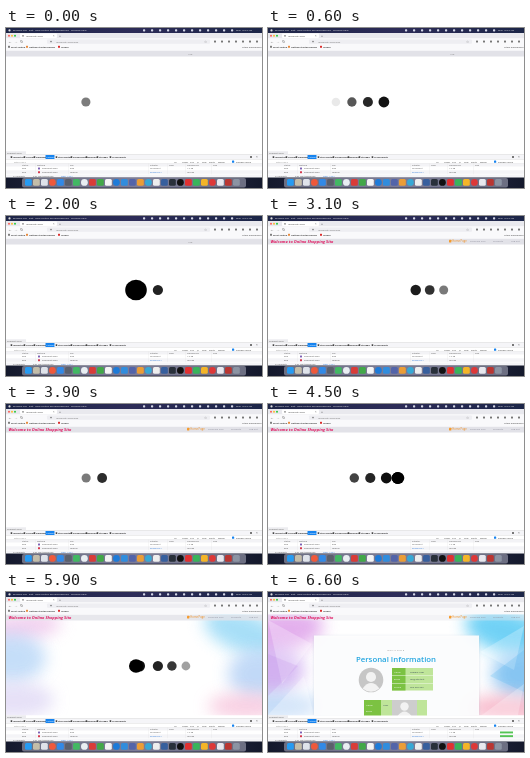
An HTML page for the animation above (7000 ms loop, 256x160 px).

```html
<!DOCTYPE html>
<html lang="en">
<head>
<meta charset="utf-8">
<style>
html, body { margin: 0; width: 100%; height: 100%; overflow: hidden; background: #fff; }
svg { display: block; width: 256px; height: 160px; font-family: "Open Sans", sans-serif; }
</style>
</head>
<body>
<svg id="stage" viewBox="0 0 256 160"></svg>
<script>
const rect = (x, y, w, h, fill, rx = 0, more = '') =>
  `<rect x="${x}" y="${y}" width="${w}" height="${h}" fill="${fill}" rx="${rx}" ${more}/>`;
const dot = (x, y, r, fill) => `<circle cx="${x}" cy="${y}" r="${r}" fill="${fill}"/>`;
const text = (x, y, size, fill, str, more = '') =>
  `<text x="${x}" y="${y}" font-size="${size}" fill="${fill}" ${more}>${str}</text>`;
const glow = (x, y, rx, ry, fill, opacity, turn = 0) =>
  `<ellipse cx="${x}" cy="${y}" rx="${rx}" ry="${ry}" fill="${fill}" opacity="${opacity}" transform="rotate(${turn} ${x} ${y})" filter="url(#soft)"/>`;
const facet = (d, fill, opacity) => `<path d="${d}z" fill="${fill}" opacity="${opacity}"/>`;
const labels = (items, y, size, fill, more) => items.map(([x, s]) => text(x, y, size, fill, s, more)).join('');
const group = (id, body) => `<g id="${id}">${body}</g>`;

const defs = `<defs>
  <filter id="soft" x="-60%" y="-60%" width="220%" height="220%"><feGaussianBlur stdDeviation="8"/></filter>
  <filter id="shade"><feGaussianBlur stdDeviation="1.5"/></filter>
  <clipPath id="page"><rect y="22" width="256" height="101.5"/></clipPath>
  <linearGradient id="menu"><stop stop-color="#1d2547"/><stop offset=".5" stop-color="#2d2c58"/><stop offset="1" stop-color="#1c2648"/></linearGradient>
  <linearGradient id="desk"><stop stop-color="#14192c"/><stop offset=".5" stop-color="#343456"/><stop offset="1" stop-color="#14192c"/></linearGradient>
</defs>`;

function browserTop() {
  const menus = [[7, 'Browser'], [17, 'File'], [23, 'Edit'], [29, 'View'], [35, 'History'], [44, 'Bookmarks'], [57, 'Tools'], [65, 'Window'], [75, 'Help']];
  let out = rect(0, 0, 256, 5, 'url(#menu)') + dot(3.5, 2.4, 1.1, '#ddd') + labels(menus, 3.4, 2.5, '#eee');
  for (let x = 137; x < 226; x += 8) out += rect(x, 1.3, 2.2, 2.2, '#d5d8e8', .7);
  out += text(230, 3.4, 2.4, '#eee', 'Mon 10:24 AM');
  out += rect(0, 5, 256, 5.5, '#e9e9ee') + rect(14, 5.6, 37, 4.4, '#fff', 1);
  ['#fb5f57', '#fdbc2e', '#2ac840'].forEach((c, i) => out += dot(3 + i * 3, 7.7, 1, c));
  out += dot(17, 7.8, .9, '#888') + text(20, 8.8, 2.5, '#333', 'localhost:4200') + text(47, 8.8, 2.6, '#666', '×') + text(53, 9, 3.5, '#555', '+');
  out += rect(0, 10.5, 256, 12, '#f9f9fb') + rect(41, 11.4, 163, 4.4, '#eeeef2', 1);
  out += text(2, 15, 4, '#555', '←') + text(8, 15, 4, '#aaa', '→') + text(14, 15, 4, '#555', '↻');
  out += dot(45, 13.6, .8, '#777') + text(50, 14.5, 2.5, '#666', 'localhost:4200/info');
  out += text(198, 15, 3.5, '#666', '☆');
  for (let x = 208; x < 254; x += 7) out += rect(x, 12.4, 2, 2.2, '#777', .6);
  const marks = [[5, 'Most Visited'], [23, 'Getting Started'], [41, 'Guides'], [55, 'Videos']];
  out += labels(marks, 20, 2.4, '#222', 'font-weight="600"') + rect(2, 17.8, 2, 2, '#777', .5) + rect(20, 17.8, 2, 2, '#e78432', .5) + rect(52, 17.8, 2, 2, '#d92323', .5);
  return out + text(236, 20, 2.4, '#333', 'Other Bookmarks');
}

function devTools() {
  const tabs = [[7, 'Inspector'], [20, 'Console'], [30, 'Debugger'], [52, 'Style Editor'], [67, 'Performance'], [82, 'Memory'], [93, 'Storage'], [106, 'Accessibility']];
  const filters = [[168, 'All'], [176, 'HTML'], [184, 'CSS'], [191, 'JS'], [196, 'XHR'], [203, 'Fonts'], [212, 'Media'], [230, 'Disable Cache']];
  const heads = [[16, 'Status'], [31, 'Method'], [64, 'File'], [144, 'Initiator'], [163, 'Type'], [181, 'Transferred'], [207, 'Size']];
  let out = rect(0, 123.5, 256, 26, '#fff') + rect(0, 126.5, 256, 5, '#f5f5f8') + rect(0, 126.3, 256, .4, '#ccc');
  out += rect(0, 123.3, 20, 3, '#ececef') + text(1, 125.6, 2.2, '#555', 'localhost:4200');
  out += labels(tabs, 130, 2.4, '#111', 'font-weight="600"') + rect(39.5, 127, 9, 4, '#1683ef', .5) + text(40.2, 130, 2.3, '#fff', 'Network');
  tabs.forEach(([x]) => out += rect(x - 2.4, 128.2, 1.7, 1.7, '#444', .4));
  out += rect(244, 128, 2, 2, '#777') + text(250, 130.3, 3, '#555', '×');
  out += rect(0, 131.5, 256, .3, '#ccc') + text(8, 134.5, 2.4, '#888', 'Filter URLs') + labels(filters, 134.5, 2.3, '#333') + rect(226, 132.6, 2.2, 2.2, '#1683ef', .4);
  out += rect(0, 135.5, 256, 3, '#f3f3f6') + rect(0, 135.4, 256, .3, '#d5d5da') + labels(heads, 137.8, 2.2, '#555');
  [141.4, 145.1].forEach((y, i) => {
    if (i) out += rect(0, y - 2.8, 256, 3.5, '#f4f4f7');
    out += text(16, y, 2.3, '#333', i ? '304' : '200') + rect(32, y - 1.9, 2, 2, i ? '#d6364b' : '#7b60b4', .4);
    out += text(36, y, 2.3, '#444', 'localhost:4200') + text(64, y, 2.3, '#444', i ? 'main.js' : 'info');
    out += text(144, y, 2.2, i ? '#2373d9' : '#555', i ? 'polyfills.js:1' : 'document') + text(181, y, 2.2, '#555', i ? 'cached' : '1.2 kB');
  });
  heads.slice(1).forEach(([x]) => out += rect(x - 1.5, 135.5, .25, 11, '#ddd'));
  out += rect(0, 146.5, 256, 3, '#f5f5f8') + text(7, 148.8, 2.2, '#555', '24 requests');
  return out + text(27, 148.8, 2.2, '#555', '3.84 MB transferred') + text(55, 148.8, 2.2, '#2373d9', 'load: 1.20 s');
}

function dock() {
  const colors = ['#269bf2', '#c3bda9', '#dfe3ea', '#ef593b', '#3289e6', '#5b606c', '#42b863', '#e9eef2', '#d93c38', '#42a848', '#f4f4f4', '#1e7bd8', '#318ddd',
    '#5364a9', '#eb9d36', '#37a8d5', '#eee', '#375f9d', '#29303a', '#111', '#e03131', '#39b45b', '#f4b528', '#dd3838', '#e8e8ee', '#b93632', '#8c94a3'];
  const icon = (c, i) => i % 4 == 3 ? dot(22.4 + i * 8, 154.4, 3.4, c) : rect(19 + i * 8, 151, 6.8, 6.8, c, 1.5);
  return rect(0, 149.5, 256, 10.5, 'url(#desk)') + rect(16, 150, 224, 9.5, '#dfe0f0', 2, 'opacity=".42"') + colors.map(icon).join('');
}

const wash = glow(12, 36, 44, 14, '#eec3ea', .75, -8) + glow(6, 66, 34, 24, '#bcd9f8', .85) + glow(8, 108, 40, 18, '#d9d0f3', .65)
  + glow(238, 40, 42, 20, '#9fdcf7', .9, 20) + glow(252, 82, 30, 24, '#b7d3f6', .85) + glow(240, 114, 38, 13, '#f7c4dc', .8);

const vivid = glow(8, 40, 48, 22, '#dfa3ea', .85, -10) + glow(4, 78, 32, 24, '#cdaaf0', .8) + glow(8, 114, 44, 14, '#b4d2f5', .8)
  + glow(240, 40, 44, 22, '#62cdf5', .9, 15) + glow(254, 82, 30, 24, '#8fc6f3', .9) + glow(240, 116, 42, 13, '#f6b0c4', .85)
  + facet('M0 28L44 52L14 92', '#fff', .25) + facet('M0 62L30 74L0 104', '#b678e0', .16) + facet('M0 123L36 84L46 123', '#fff', .28)
  + facet('M256 34L212 60L246 78', '#fff', .25) + facet('M256 58L222 84L256 100', '#2fa6ea', .18) + facet('M256 92L214 123H250', '#fff', .25)
  + rect(46, 44, 165, 90, '#8a9bb5', 0, 'opacity=".3" filter="url(#shade)"') + rect(46, 43.5, 165, 90, '#fff', 0, 'opacity=".9"');

const avatar = (x, y, r) => dot(x, y - r * .25, r * .42, '#f2f2f2')
  + `<path d="M${x - r * .7} ${y + r * .7}Q${x} ${y - r * .2} ${x + r * .7} ${y + r * .7}Q${x} ${y + r * 1.25} ${x - r * .7} ${y + r * .7}" fill="#f2f2f2"/>`;

function profile() {
  let out = text(128, 59, 2.5, '#888', 'WELCOME', 'text-anchor="middle" letter-spacing=".8"');
  out += text(128, 70.3, 7.8, '#22a5e0', 'Personal Information', 'text-anchor="middle" font-weight="600"');
  out += dot(103, 88, 12.3, '#c6c6c6') + avatar(103, 88, 12);
  out += rect(124, 76, 41, 22.5, '#bfe59a') + rect(124, 76, 13.5, 22.5, '#7cc242');
  ['Name', 'Email', 'Phone'].forEach((s, i) => {
    out += text(126, 81 + i * 7.4, 2.4, '#fff', s) + text(142, 81 + i * 7.4, 2.4, '#345', ['Sample User', 'me@site.test', '000 000 000'][i]);
    if (i) out += rect(124, 76 + i * 7.5, 41, .5, '#f2faea');
  });
  out += rect(96, 108, 63, 17, '#bfe59a') + rect(96, 108, 17, 17, '#7cc242') + rect(124, 108, 25, 17, '#cdcdcd');
  out += text(98, 114, 2.4, '#fff', 'Name') + text(98, 120, 2.4, '#fff', 'Email') + text(115, 114, 2.4, '#345', 'User');
  return out + avatar(136.5, 117, 10);
}

const nav = [[202, 'Personal Info'], [225, 'Products'], [243, 'Log out']];
const header = text(2.5, 26.8, 4.05, '#e01660', 'Welcome to Online Shopping Site', 'font-weight="700" font-style="italic"')
  + rect(181, 23.8, 2.4, 2.6, '#f59b2e', .4) + text(184.3, 26.4, 2.7, '#f08c1c', 'Home Page') + labels(nav, 26.4, 2.5, '#8b8b99');

const stage = document.getElementById('stage');
stage.innerHTML = defs + rect(0, 0, 256, 160, '#fff')
  + `<g clip-path="url(#page)">${group('wash', wash)}${group('vivid', vivid)}</g>`
  + rect(0, 22.5, 256, 6, '#e2e2e8', 0, 'id="bar"') + text(182.2, 26.5, 2.5, '#888', 'Log', 'id="stub"')
  + group('header', header) + group('loader', '<circle cy="74"/>'.repeat(5) + '<ellipse cx="130" cy="74"/>') + group('profile', profile())
  + browserTop() + devTools() + group('bars', rect(232, 139.5, 13, 1.9, '#54c454') + rect(232, 143.2, 13, 1.9, '#54c454')) + dock();

const el = id => document.getElementById(id);
const show = (id, on) => el(id).setAttribute('visibility', on ? 'visible' : 'hidden');
const set = (node, attrs) => Object.entries(attrs).forEach(([k, v]) => node.setAttribute(k, v));
const clamp = v => Math.max(0, Math.min(1, v));

// Piecewise linear curve through [x, y] points.
function curve(points, x) {
  if (x <= points[0][0]) return points[0][1];
  for (let i = 1; i < points.length; i++) {
    const [x0, y0] = points[i - 1], [x1, y1] = points[i];
    if (x <= x1) return y0 + (y1 - y0) * (x - x0) / (x1 - x0);
  }
  return points[points.length - 1][1];
}

const PERIOD = 3400, CENTER = 129.5;
const CLOCK = [[0, 300], [1200, 1200], [2000, 2260], [3100, 3000], [4500, 4580], [5500, 5660], [6600, 6760]];
const GROWTH = [[1000, 0], [1010, 5.5], [1200, 6.4], [1500, 7], [1750, 9.5], [1950, 10.8], [2270, 10.8], [2500, 9], [2740, 6], [2800, 0]];

function drawLoader(time) {
  const phase = curve(CLOCK, time) % PERIOD;
  const [...shapes] = el('loader').children;
  const core = shapes.pop();
  shapes.forEach((node, i) => {
    const before = Math.max(0, 920 + i * 200 - phase), after = Math.max(0, phase - 1940 - i * 200);
    const away = before + after;
    set(node, {
      cx: CENTER - before * .08 + after * .07 * Math.min(1, after / 250),
      r: 5.7 - away / 550,
      opacity: Math.min(clamp((800 - before) / 350), clamp((860 - after) / 380), 1 - Math.min(away, 2000) / 2400)
    });
  });
  const r = curve(GROWTH, phase);
  set(core, { rx: r, ry: r * .95 });
}

function draw() {
  const time = Math.min(6600, Math.floor(performance.now() % 7000 / 100) * 100);
  const headed = time >= 2800, washed = time >= 5200, loaded = time >= 6100;
  show('header', headed);
  show('stub', !headed);
  show('wash', washed && !loaded);
  for (const id of ['vivid', 'profile', 'bars']) show(id, loaded);
  show('loader', !loaded);
  set(el('bar'), { 'fill-opacity': loaded ? .4 : washed ? .8 : 1 });
  drawLoader(time);
  requestAnimationFrame(draw);
}
draw();
</script>
</body>
</html>
```
